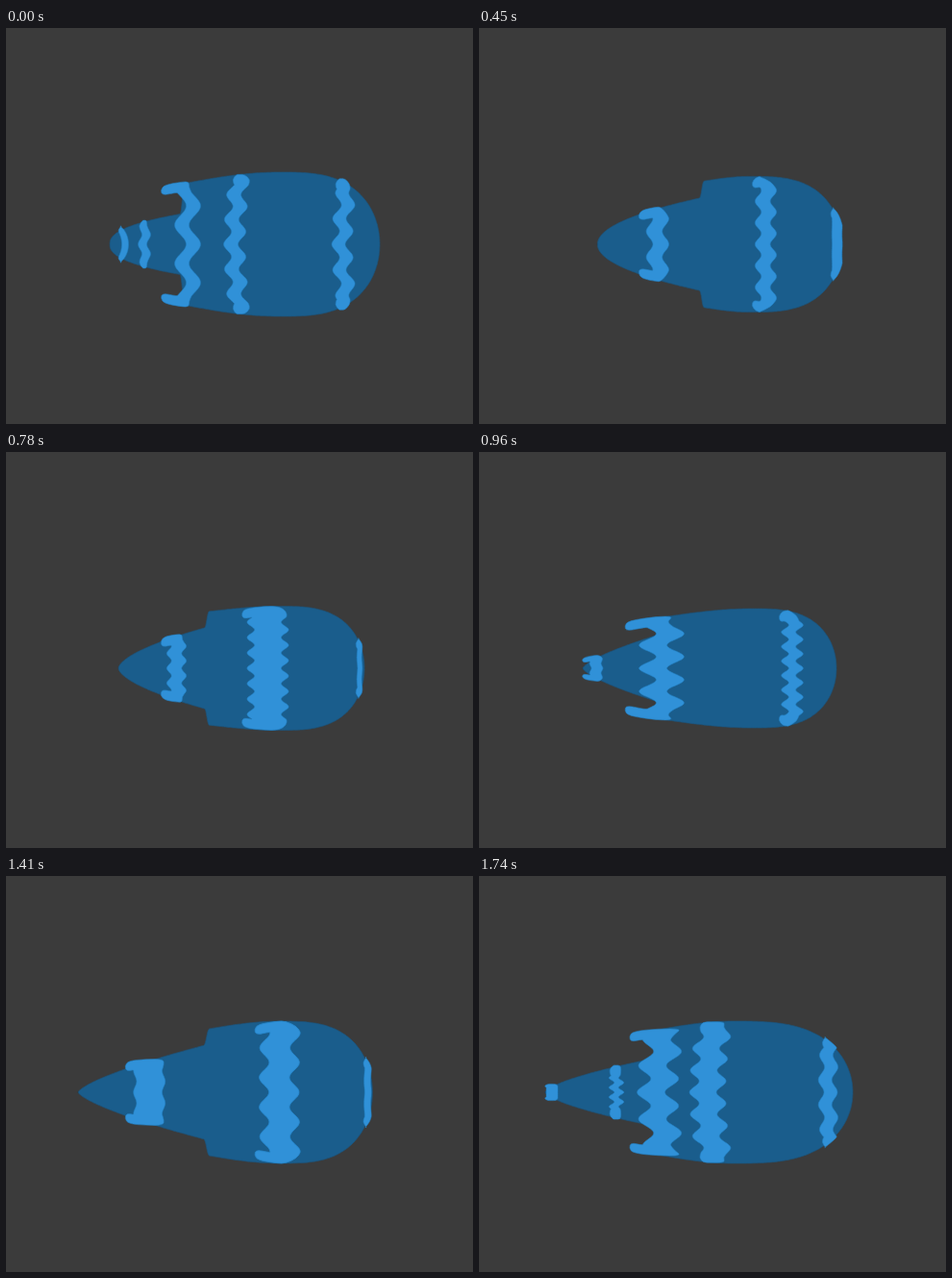
Animation of 486 by 412 pixels, one loop 1.77 s. Source, as an HTML page:

```html
<!DOCTYPE html>
<html lang="en">
<head>
<meta charset="utf-8">
<title>Banded flow</title>
<style>
  html, body { margin: 0; width: 100%; height: 100%; overflow: hidden; background: #3b3b3b; }
  svg { display: block; width: 100%; height: 100%; }
  .body { fill: #1a5d8c; stroke: #1d547a; stroke-width: .7; }
  .band { fill: #3091d8; stroke: #2480c2; stroke-width: .6; }
</style>
</head>
<body>
<svg viewBox="0 0 486 412"></svg>
<script>
const LOOP = 1770, MID = 225;
const TIMES = [0, 270, 600, 960, 1230, 1560, 1740];
const svg = document.querySelector('svg');

const mix = (a, b, u) => a + (b - a) * u;
const clamp = (v, lo, hi) => Math.max(lo, Math.min(hi, v));

// Body poses: a tail that swells to a step, then a dome.
const BODY = ['tip', 'step', 'tail', 'power', 'shoulder', 'crest', 'height', 'end'];
const bodyKeys = [
  [108, 184, 32, .42, 63, 285, 75, 389],
  [120, 235, 47, .48, 66, 280, 75, 382],
  [126, 230, 50, .5, 65, 285, 67, 374],
  [108, 190, 36, .7, 53, 285, 62, 372],
  [74, 178, 41, .85, 55, 272, 69, 377],
  [76, 232, 56, .6, 74, 298, 78, 385],
  [69, 186, 36, .65, 65, 265, 74, 389]
].map((row, i) => named(BODY, TIMES[i], row));

// Band poses: centre, width, zigzag wavelength and depth, curled end, lean of the ends.
const BAND = ['x', 'w', 'wave', 'zig', 'hook', 'lean'];
const bands = [];

function named(names, t, row) {
  return Object.assign({ t }, ...names.map((n, i) => ({ [n]: row[i] || 0 })));
}

// Bands are born at the blunt end and shrink away at the tip.
function band(first, ...rows) {
  const keys = rows.map((row, i) => named(BAND, TIMES[first + i], row));
  const last = first + rows.length - 1;
  if (first > 0) keys.unshift(named(BAND, mix(TIMES[first - 1], TIMES[first], .45), [384, 4, 24]));
  if (last < TIMES.length - 1) keys.push(named(BAND, mix(TIMES[last], TIMES[last + 1], .45), [90, 1, 24]));
  bands.push({ keys, el: null });
}

band(0, [124, 7, 24, 0, 0, -7]);
band(0, [144, 9, 20, -2]);
band(0, [189, 15, 40, 6, 15], [124, 7, 20]);
band(0, [238, 15, 26, -4, 0, 6], [154, 19, 32, 2, 6]);
band(0, [350, 14, 27, -4, 0, 6], [242, 21, 48, 4, 23], [139, 13, 9, 3, 5]);
band(1, [377, 12, 24], [233, 19, 21, -6, 12], [122, 12, 10, 1, 7]);
band(2, [355, 42, 8, 1], [190, 29, 24, -9, 20], [84, 16, 24]);
band(3, [326, 15, 15, 4, 4], [183, 26, 28, -6, 11], [121, 33, 18, 2, 4], [76, 12, 24]);
const young = [347, 21, 32, 4, 10, -6];
const wide = [232, 40, 30, 6, 18, 8];
band(4, young, wide, [143, 10, 10, 3]);
band(4, young, wide, [186, 29, 28, -7, 12, 8]);
band(5, [348, 21, 26, 2], [238, 28, 23, -5, 0, 8]);
band(6, [363, 14, 26, 3, 0, 3]);

function at(keys, t) {
  if (t < keys[0].t) return null;
  const i = keys.findIndex(k => k.t > t);
  const b = keys[i < 0 ? keys.length - 1 : i];
  if (i < 0) return b.t === t || b.t === TIMES[TIMES.length - 1] ? b : null;
  const a = keys[i - 1], u = (t - a.t) / (b.t - a.t), out = {};
  for (const n in a) out[n] = mix(a[n], b[n], u);
  return out;
}

function profile(b, x) {
  x = clamp(x, b.tip, b.end);
  if (x < b.step) return b.tail * ((x - b.tip) / (b.step - b.tip)) ** b.power;
  if (x < b.crest) return mix(b.shoulder, b.height, Math.sin(Math.PI / 2 * (x - b.step) / (b.crest - b.step)));
  return b.height * Math.sqrt(1 - ((x - b.crest) / (b.end - b.crest)) ** 3);
}

// Where the dome ends at a given height.
const domeX = (b, h) => mix(b.crest, b.end, Math.cbrt(Math.max(0, 1 - (h / b.height) ** 2)));

function bodyHalf(b) {
  const n = 160;
  return Array.from({ length: n + 1 }, (_, i) => {
    const x = mix(b.tip, b.end, (1 - Math.cos(Math.PI * i / n)) / 2);
    return [x, profile(b, x)];
  });
}

function bandHalf(p, b) {
  const x = clamp(p.x, b.tip + 3, b.end - 5);
  const top = Math.max(profile(b, x - p.w / 2), profile(b, x + 6));
  const thick = Math.min(11, top * .45), neck = top - thick;
  const centre = h => x + p.zig * Math.cos(2 * Math.PI * h / p.wave) + p.lean * (h / top) ** 2;
  const left = h => centre(h) - p.w / 2;
  const right = h => Math.max(left(h) + 2, Math.min(centre(h) + p.w / 2, domeX(b, h) + 3));
  const n = Math.ceil(neck / 1.5) + 1;
  const levels = Array.from({ length: n + 1 }, (_, i) => neck * i / n);
  const tip = left(neck) - p.hook, droop = p.hook * .22;
  return [
    ...levels.map(h => [left(h), h]),
    [tip, neck - droop],
    [tip - 2, neck + thick / 2 - droop],
    [tip + 2, top - droop],
    [mix(left(neck), right(top), .4), top],
    [right(top) - 2, top],
    [right(neck + thick / 2), neck + thick / 2],
    ...levels.reverse().map(h => [right(h), h])
  ];
}

// Mirrors the upper half and rounds every corner.
function outline(half) {
  const pts = [
    ...half.map(([x, h]) => [x, MID - h]),
    ...half.slice().reverse().map(([x, h]) => [x, MID + h])
  ];
  const f = p => p[0].toFixed(1) + ' ' + p[1].toFixed(1);
  const half2 = (p, q) => f([(p[0] + q[0]) / 2, (p[1] + q[1]) / 2]);
  const d = pts.map((p, i) => 'Q' + f(p) + ' ' + half2(p, pts[(i + 1) % pts.length]));
  return 'M' + half2(pts[pts.length - 1], pts[0]) + d.join('') + 'Z';
}

function path(cls) {
  const el = document.createElementNS('http://www.w3.org/2000/svg', 'path');
  el.setAttribute('class', cls);
  return svg.appendChild(el);
}

const bodyEl = path('body');
for (const s of bands) s.el = path('band');

// The picture is held for 90 ms at a time, restarting the count twice per loop.
function held(t) {
  const base = t < 600 ? 0 : t < 1560 ? 600 : 1560;
  return base + Math.floor((t - base) / 90) * 90;
}

let shown = -1;
function draw(now) {
  const t = held(now % LOOP);
  if (t === shown) return;
  shown = t;
  const b = at(bodyKeys, t);
  bodyEl.setAttribute('d', outline(bodyHalf(b)));
  for (const s of bands) {
    const p = at(s.keys, t);
    s.el.setAttribute('d', p ? outline(bandHalf(p, b)) : '');
  }
}

const start = performance.now();
function tick() {
  draw(performance.now() - start);
  requestAnimationFrame(tick);
}
tick();
</script>
</body>
</html>
```
